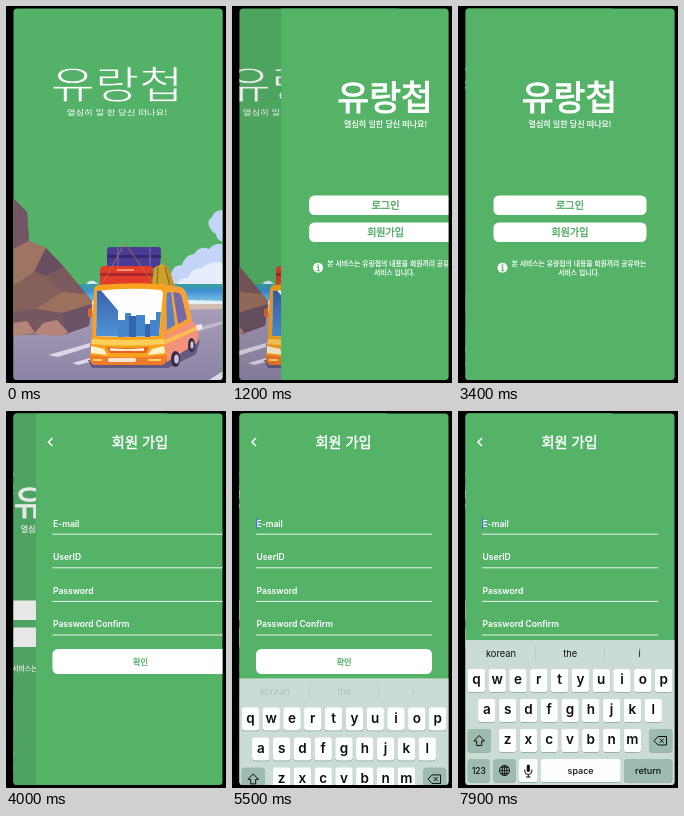
Animation, 220 px wide and 377 px high, one loop 8000 ms. Source, as an HTML page:

```html
<!DOCTYPE html>
<html lang="ko">
<head>
<meta charset="utf-8">
<title>유랑첩</title>
<style>
  html, body { margin: 0; width: 100%; height: 100%; overflow: hidden; background: #000; }
  svg { display: block; width: 100%; height: 100%; }
  text { font-family: "Noto Sans CJK KR", "Noto Sans CJK", sans-serif; fill: #fff; text-anchor: middle; }
  .latin text { font-family: Inter, Roboto, sans-serif; }
  .label text { text-anchor: start; font-size: 8.6px; font-weight: 600; }
  .medium { stroke: #fff; stroke-width: .03em; }
  .thin { stroke: #53b267; stroke-width: .022em; }
  .green { fill: #45a65a; stroke: #45a65a; }
  #keyboard text { fill: #0c0f0e; }
</style>
</head>
<body>
<svg viewBox="0 0 220 377">
  <defs>
    <clipPath id="screen"><rect x="7.5" y="2.5" width="209" height="371.5" rx="3.5"/></clipPath>
    <linearGradient id="sea" x1="0" y1="0" x2="0" y2="1">
      <stop offset="0" stop-color="#38a09c"/><stop offset=".35" stop-color="#3d8fd0"/><stop offset="1" stop-color="#8fcdea"/>
    </linearGradient>
    <linearGradient id="road" x1="0" y1="0" x2="0" y2="1">
      <stop offset="0" stop-color="#a79db8"/><stop offset="1" stop-color="#8c83a5"/>
    </linearGradient>
    <linearGradient id="glass" x1="0" y1="0" x2="0" y2="1">
      <stop offset="0" stop-color="#3a62ac"/><stop offset="1" stop-color="#4f93d6"/>
    </linearGradient>
  </defs>
  <rect width="220" height="377"/>
  <g clip-path="url(#screen)">

    <g id="splash">
      <rect x="7" y="2" width="210" height="373" fill="#53b267"/>
      <g transform="translate(111 0) scale(1.28 1)">
        <text class="thin" y="92" font-size="37.5" font-weight="300">유랑첩</text>
        <text y="109.5" font-size="7.4">열심히 일 한 당신 떠나요!</text>
      </g>
      <!-- clouds, sea, beach -->
      <path d="M217 204q-9 0-11 7q-5 3-3 9q2 5 7 8q0 5 7 8z" fill="#c3d4f6"/>
      <path d="M156 281q0-11 9-13q2-9 11-9q3-10 12-11q6-9 15-5q5-6 14-5v43z" fill="#c3d4f6"/>
      <path d="M170 281q2-10 12-9q4-11 14-10q8-8 21-5v24z" fill="#e6eefb"/>
      <path d="M80 279q2-5 8-4l6 4z" fill="#dbe7f8"/>
      <rect x="58" y="278" width="159" height="20" fill="url(#sea)"/>
      <path d="M58 296q80-4 159-1v5H58z" fill="#e3eef5"/>
      <path d="M58 299l159-1v14H58z" fill="#d4bcb3"/>
      <!-- road -->
      <path d="M7 328L90 306L217 303V375H7z" fill="url(#road)"/>
      <path d="M42 349l42-12v4l-32 10zM66 357l18-5v4l-12 3zM203 374l14-9v9z" fill="#dcd6e6"/>
      <path d="M190 322l27-7v3l-27 8z" fill="#c4bacd"/>
      <!-- rocks -->
      <path d="M7 192l14 14l2 29l17 7l18 19l28 34l-3 24l-23 9l-53 1z" fill="#87635c"/>
      <path d="M7 192l14 14l2 29l-16 8z" fill="#735565"/>
      <path d="M7 243l16-8l17 7l-12 24l-21 14z" fill="#a07463"/>
      <path d="M40 242l18 19l-18 9l-12-4z" fill="#684e60"/>
      <path d="M40 270l18-9l22 27l-24-2z" fill="#7b5a5d"/>
      <path d="M7 280l21-14l12 4l16 16l-26 17l-23 3z" fill="#85605a"/>
      <path d="M30 303l26-17l24 2l6 10l-30 9z" fill="#9b715e"/>
      <path d="M7 306l23-3l26 4l4 14l-53 8z" fill="#74585f"/>
      <path d="M56 307l30-9l-3 22l-23 8z" fill="#6b5264"/>
      <path d="M28 328l9-11l14-3l11 12l-7 4zM7 317l14-2l8 12l-22 3z" fill="#b48479"/>
      <!-- luggage -->
      <path d="M104 241h48q3 0 3 3l-1 18h-53v-17q0-4 3-4z" fill="#4a3b94"/>
      <path d="M101 249h54v3h-54z" fill="#342a70"/>
      <path d="M112 241v20M144 241v20" stroke="#6c5cab" stroke-width="1.5"/>
      <path d="M98 260h45q4 0 4 4l-1 17H94v-17q0-4 4-4z" fill="#e23c28"/>
      <path d="M94 267h53v3H94z" fill="#a9272d"/>
      <path d="M111 264h17" stroke="#f6b58a" stroke-width="1.5"/>
      <path d="M146 279l3-18l7-3l7 4l6 19z" fill="#cda12a"/>
      <path d="M152 261l-1 18M159 261l5 19" stroke="#8f6b1d" stroke-width="1.3"/>
      <path d="M95 280L119 237L148 279M157 246L167 280" fill="none" stroke="#b07c4a" stroke-width=".8"/>
      <!-- bus -->
      <path d="M82 354l80-2l32-18l-4 14l-28 14H86z" fill="#645a80"/>
      <path d="M152 278l22 3q5 1 7 9l5 25l7 7l-2 15l-30 19l-8-30z" fill="#f3917a"/>
      <path d="M152 278l22 3q5 1 7 9l5 25l-24 14z" fill="#f7a234"/>
      <path d="M160 287l5-1l4 33l-8 5z" fill="#5b7fc0"/>
      <path d="M167 286l6 1q2 1 3 5l5 21l-9 5z" fill="#7668a8"/>
      <path d="M158 334l33-14v4l-33 15z" fill="#f9bd50"/>
      <ellipse cx="169.500" cy="353" rx="4.500" ry="8" fill="#352c4a"/>
      <ellipse cx="170.500" cy="353" rx="2.300" ry="4.500" fill="#cfc4d4"/>
      <ellipse cx="185.500" cy="339" rx="3.500" ry="7" fill="#352c4a"/>
      <ellipse cx="186" cy="339" rx="1.600" ry="3.800" fill="#cfc4d4"/>
      <path d="M92 279q32-3 62-1q7 1 7 8l-3 46l3 18q0 9-7 9H90q-6 0-6-8l2-18l2-48q0-5 4-6z" fill="#f9a21d"/>
      <path d="M91 285q32-4 64-1l2 3l-4 43q-32 2-63 0z" fill="#fdfdff"/>
      <path d="M91 285l4-.5l17 20v26l-22-.5z" fill="url(#glass)"/>
      <path d="M112 331v-17h7v-7h6v4h5v-2h9v9h5v-4h6v-8h5l-2 24z" fill="#4384ca"/>
      <path d="M123 331v-21h7v21zM139 331v-13h5v13z" fill="#3566ae"/>
      <path d="M86 333q35 2 72 0l1 5q-37 3-74 0z" fill="#ffd05a"/>
      <path d="M100 341q22 2 43 0l-3 6h-36z" fill="#e0661f"/>
      <path d="M104 342q17 2 34 0v3h-34z" fill="#fbe6d0"/>
      <path d="M85 340l13 3l3 6l-16-2zM158 340l-12 3l-4 6l17-2z" fill="#fff3cf"/>
      <path d="M84 349q38 5 77 0v3q0 7-7 7H90q-6 0-6-7z" fill="#ef7a2a"/>
      <rect x="102" y="352" width="28" height="4" rx="1" fill="#f8e4d0"/>
      <path d="M87 354h9M142 354h13" stroke="#ffd566" stroke-width="2"/>
      <path d="M190 319l6-1v5l-5 2z" fill="#efe6ef"/>
      <path d="M86 302l-4 1v8h4z" fill="#d9692c"/>
      <rect class="dim" x="7" y="2" width="210" height="373"/>
    </g>

    <g id="welcome">
      <rect x="7.5" y="2" width="209.500" height="373" fill="#55b368"/>
      <text class="medium" x="111.500" y="103.500" font-size="34.600">유랑첩</text>
      <text class="medium" x="112" y="121" font-size="8">열심히 일한 당신 떠나요!</text>
      <rect x="35.500" y="189.500" width="153" height="19.500" rx="5.500" fill="#fff"/>
      <text class="medium green" x="112" y="202.800" font-size="10.200">로그인</text>
      <rect x="35.500" y="216.500" width="153" height="19.500" rx="5.500" fill="#fff"/>
      <text class="medium green" x="112" y="229.800" font-size="10">회원가입</text>
      <circle cx="44.500" cy="261.800" r="5" fill="#fff"/>
      <path d="M43.300 261.100h1.600v3.500M43 264.800h3.400" fill="none" stroke="#55b368" stroke-width="1.100"/>
      <circle cx="44.500" cy="259.100" r=".9" fill="#55b368"/>
      <text class="medium" x="121" y="260.300" font-size="6.800">본 서비스는 유랑첩의 내용을 회원끼리 공유하는</text>
      <text class="medium" x="121" y="269" font-size="6.800">서비스 입니다.</text>
      <rect class="dim" x="7" y="2" width="210" height="373"/>
    </g>

    <g id="signup">
      <rect x="7.500" y="2" width="209.500" height="373" fill="#55b368"/>
      <path d="M24 27l-4 4l4 4" fill="none" stroke="#fff" stroke-width="1.500"/>
      <text class="medium" x="111.500" y="35.500" font-size="14.200">회원 가입</text>
      <g id="fields" class="latin label"></g>
      <rect id="caret" x="24" y="107" width="1.300" height="11" fill="#3f6ff0"/>
      <rect x="24" y="238" width="176" height="25" rx="5.500" fill="#fff"/>
      <text class="medium green" x="112" y="253.500" font-size="8.200">확인</text>
    </g>

    <g id="keyboard" class="latin">
      <rect x="7" y="229" width="210" height="146" fill="#cbdcd4"/>
      <path d="M77.500 236v13M146.500 236v13" stroke="#b2c4bb" stroke-width=".7"/>
      <g id="hints" font-size="9.300"></g>
      <g id="keys"></g>
      <g fill="none" stroke="#0c0f0e" stroke-width="1" stroke-linejoin="round">
        <path d="M21.200 324.500l5.300 5.500h-2.800v4.500h-5v-4.500h-2.800z"/>
        <path d="M200 325.500h8.500v8.500h-8.500l-4-4.250zM201.700 327.700l4 4M205.700 327.700l-4 4"/>
        <circle cx="46.500" cy="359.500" r="5"/>
        <ellipse cx="46.500" cy="359.500" rx="2.300" ry="5"/>
        <path d="M41.500 359.500h10M46.500 354.500v10M42.700 356.700h7.600M42.700 362.300h7.600" stroke-width=".8"/>
        <path d="M66.800 358.500v1.500a3.500 3.500 0 0 0 7 0v-1.500M70.300 363.500v2.500M68 366h4.600"/>
        <rect x="68.800" y="353.500" width="3" height="7.500" rx="1.500" fill="#0c0f0e" stroke="none"/>
      </g>
    </g>
  </g>
</svg>
<script>
const LOOP = 8000, WIDTH = 208, PITCH = 20.8;
const $ = id => document.getElementById(id);

function add(parent, tag, attrs, text) {
  const el = document.createElementNS("http://www.w3.org/2000/svg", tag);
  for (const k in attrs) el.setAttribute(k, attrs[k]);
  if (text) el.textContent = text;
  parent.appendChild(el);
  return el;
}

["E-mail", "UserID", "Password", "Password Confirm"].forEach((name, i) => {
  const y = 115.5 + i * 33.6;
  add($("fields"), "text", { x: 24.5, y }, name);
  add($("fields"), "rect", { x: 24, y: y + 7.2, width: 176, height: 1, fill: "#e9f6ec" });
});

["korean", "the", "i"].forEach((word, i) =>
  add($("hints"), "text", { x: 43 + i * 69.3, y: 246 }, word));

function key(x, y, w, label, dark, size = 13.5) {
  const box = { x, width: w, height: 23, rx: 2.8 };
  add($("keys"), "rect", { ...box, y: y + 0.8, fill: "#8ca298" });
  add($("keys"), "rect", { ...box, y, fill: dark ? "#9dbbae" : "#fdfefe" });
  if (label) add($("keys"), "text", {
    x: x + w / 2, y: y + (size > 10 ? 15.3 : 14.6), "font-size": size, "font-weight": size > 10 ? 600 : 500
  }, label);
}

["qwertyuiop", "asdfghjkl", "zxcvbnm"].forEach((row, r) => {
  const left = 112 - row.length * PITCH / 2;
  [...row].forEach((c, i) => key(left + i * PITCH + 1.7, 258 + r * 30, 17.4, c));
});
key(9.7, 318, 23, "", true);
key(191.3, 318, 23, "", true);
key(9.7, 348, 22.3, "123", true, 8.4);
key(35.3, 348, 22.4, "", true);
key(61, 348, 18.6, "");
key(82.6, 348, 80, "space", false, 9);
key(166, 348, 48.3, "return", true, 9);

// Critically damped spring, 0 to 1
function spring(t, start) {
  const x = Math.max(0, t - start) * 0.019;
  return 1 - (1 + x) * Math.exp(-x);
}
const clamp = v => Math.min(1, Math.max(0, v));
const move = (id, x, y) => $(id).setAttribute("transform", `translate(${x.toFixed(2)} ${y.toFixed(2)})`);
const fade = (el, v) => el.setAttribute("opacity", v.toFixed(3));

function draw(t) {
  const first = spring(t, 1042), second = spring(t, 3800), rise = spring(t, 5362);
  move("splash", -0.3 * WIDTH * first, 0);
  move("welcome", (WIDTH + 1) * (1 - first) - 0.3 * WIDTH * second, 0);
  move("signup", (WIDTH + 1) * (1 - second), 0);
  move("keyboard", 0, 146 * (1 - rise));
  fade(document.querySelector("#splash .dim"), 0.1 * first);
  fade(document.querySelector("#welcome .dim"), 0.1 * second);
  fade($("hints"), clamp((t - 5460) / 300));

  const blink = (t - 5250) % 870;
  fade($("caret"), t < 5250 ? 0 : clamp(blink / 40) * clamp((580 - blink) / 80));
}

let origin;
function tick(now) {
  origin ??= now;
  draw((now - origin) % LOOP);
  requestAnimationFrame(tick);
}
draw(0);
requestAnimationFrame(tick);
</script>
</body>
</html>
```
